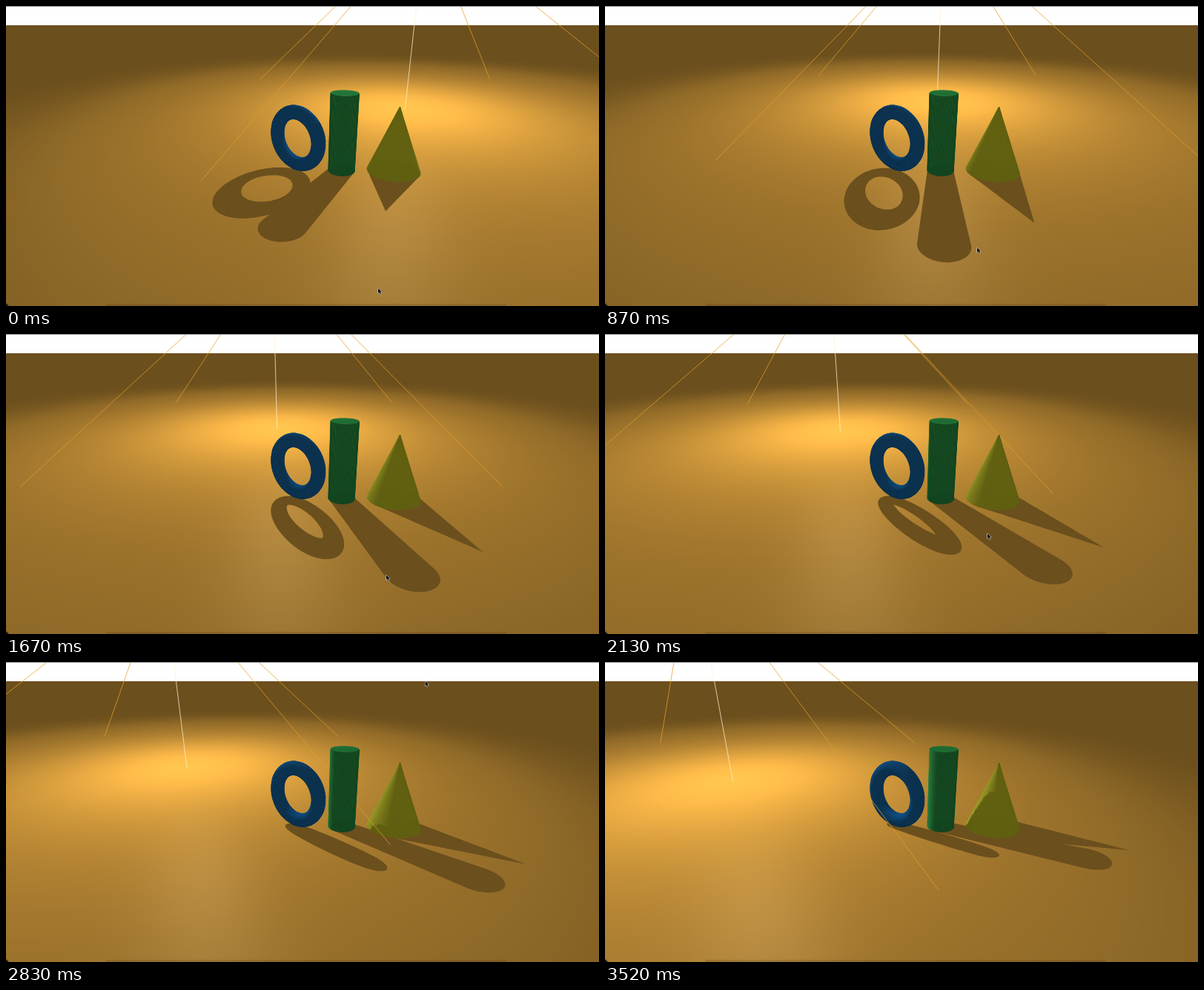
An HTML page with a canvas that plays this animation: 800 by 405 pixels, repeating every 3570 ms.

```html
<!DOCTYPE html>
<html>
<head>
<meta charset="utf-8">
<title>Spotlight over three solids</title>
<style>
html, body { margin: 0; width: 100%; height: 100%; overflow: hidden; background: #fff; }
canvas { display: block; }
</style>
</head>
<body>
<canvas id="stage" width="800" height="405"></canvas>
<script>
const ctx = document.getElementById('stage').getContext('2d');
const LOOP = 3570, STEP = 100 / 3, TAU = Math.PI * 2;

// World: x right, y up, z away from the viewer, who stands above the origin.
const eye = [0, 11.67, 0], FOCAL = 489, SIN = Math.sin(.39), COS = Math.cos(.39);
const LIGHT_HEIGHT = 20, ORBIT = 20, ORBIT_Z = 28, ROW_Z = 25.4, HORIZON = 26, CELL = 4;
const pillar = { x: 3, radius: 1, height: 6 };
const floorColor = { dark: [107, 79, 29], lit: [165, 120, 50] };

const clamp = v => Math.max(0, Math.min(1, v));
const ramp = (t, a, b) => clamp((t - a) / (b - a));
const smooth = (t, a, b) => { const u = ramp(t, a, b); return u * u * (3 - 2 * u); };
const sub = (a, b) => a.map((v, i) => v - b[i]);
const mix = (a, b, u) => a.map((v, i) => v + (b[i] - v) * u);
const dot = (a, b) => a[0] * b[0] + a[1] * b[1] + a[2] * b[2];
const unit = a => { const n = Math.hypot(...a) || 1; return a.map(v => v / n); };
const cross = (a, b) => [a[1] * b[2] - a[2] * b[1], a[2] * b[0] - a[0] * b[2], a[0] * b[1] - a[1] * b[0]];

function project([x, y, z]) {
  const drop = eye[1] - y, depth = z * COS + drop * SIN;
  return [400 + FOCAL * x / depth, 202 + FOCAL * (drop * COS - z * SIN) / depth];
}

function floorAt(sx, sy) {
  const k = (sy - 202) / FOCAL, z = eye[1] * (COS - k * SIN) / (SIN + k * COS);
  return [(sx - 400) / FOCAL * (z * COS + eye[1] * SIN), 0, z];
}

// Facets of a surface point(u, v), with u and v from 0 to 1.
function mesh(point, nu, nv, dark, lit) {
  const facets = [];
  for (let i = 0; i < nu; i++) for (let j = 0; j < nv; j++) {
    const corners = [[i, j], [i + 1, j], [i + 1, j + 1], [i, j + 1]].map(([a, b]) => point(a / nu, b / nv));
    const [a, b, c, d] = corners;
    const center = mix(mix(a, c, .5), mix(b, d, .5), .5);
    const normal = unit(cross(sub(c, a), sub(d, b)));
    const visible = dot(normal, sub(eye, center)) > 0;
    facets.push({ corners, center, normal, visible, dark, lit, screen: corners.map(project) });
  }
  return facets.sort((p, q) => q.center[2] - p.center[2]);
}

// profile(u) gives radius and height
const revolve = (x, profile) => (u, v) => {
  const [r, y] = profile(u), a = TAU * v;
  return [x + r * Math.cos(a), y, ROW_Z + r * Math.sin(a)];
};

function torus(u, v) {
  const turn = -.7, a = TAU * u, b = TAU * v, r = 2 + .5 * Math.cos(b), side = r * Math.cos(a), off = .5 * Math.sin(b);
  return [
    -.4 + side * Math.cos(turn) - off * Math.sin(turn),
    2.6 + r * Math.sin(a),
    ROW_Z + side * Math.sin(turn) + off * Math.cos(turn)
  ];
}

const pillarMesh = mesh(revolve(pillar.x, u => [u < 1 ? 1 : 0, u > 0 ? pillar.height : 0]), 2, 72, [16, 70, 32], [65, 150, 85]);
const solids = [
  mesh(torus, 72, 24, [8, 48, 80], [12, 55, 95]),
  pillarMesh,
  mesh(revolve(7, u => [2 - 2 * u, 5 * u]), 30, 72, [96, 96, 18], [110, 110, 45])
];

function brightness(p, normal, light) {
  const ray = unit(sub(light, p));
  return Math.max(0, dot(normal, ray)) * ray[1] * smooth(ray[1], .3, .5);
}

// Does the pillar stand between a point and the light?
function blocked([px, py, pz], light) {
  const dx = light[0] - px, dz = light[2] - pz, wx = pillar.x - px, wz = ROW_Z - pz;
  const len2 = dx * dx + dz * dz, near = (wx * dx + wz * dz) / len2;
  const inside = pillar.radius ** 2 - (wx * wx + wz * wz - near * near * len2);
  if (near <= 0 || inside <= 0) return false;
  const entry = near - Math.sqrt(inside / len2);
  return py + entry * (light[1] - py) < pillar.height;
}

const small = document.createElement('canvas');
small.width = 800 / CELL;
small.height = Math.ceil((405 - HORIZON) / CELL);
const smallCtx = small.getContext('2d');
const shade = smallCtx.createImageData(small.width, small.height);
const floorPoints = Array.from({ length: small.width * small.height }, (_, i) =>
  floorAt((i % small.width + .5) * CELL, HORIZON + (Math.floor(i / small.width) + .5) * CELL));

function drawFloor(light) {
  floorPoints.forEach((p, i) => {
    const b = brightness(p, [0, 1, 0], light);
    const toEye = unit(sub(eye, p)), toLight = unit(sub(light, p));
    const gloss = 18 * unit(toEye.map((v, c) => v + toLight[c]))[1] ** 40;
    for (let c = 0; c < 3; c++) shade.data[i * 4 + c] = floorColor.dark[c] + floorColor.lit[c] * b + gloss;
    shade.data[i * 4 + 3] = 255;
  });
  smallCtx.putImageData(shade, 0, 0);
  ctx.drawImage(small, 0, HORIZON, small.width * CELL, small.height * CELL);
}

function addPolygon(points) {
  points.forEach(([x, y], i) => i ? ctx.lineTo(x, y) : ctx.moveTo(x, y));
  ctx.closePath();
}

function drawShadows(light) {
  const cast = p => project(mix(light, p, light[1] / (light[1] - p[1])));
  ctx.fillStyle = `rgb(${floorColor.dark})`;
  for (const solid of solids) {
    ctx.beginPath();
    for (const f of solid) {
      if (dot(f.normal, sub(light, f.center)) > 0) addPolygon(f.corners.map(cast));
    }
    ctx.fill();
  }
}

function drawSolid(solid, light) {
  ctx.lineWidth = .6;
  for (const f of solid) {
    if (!f.visible) continue;
    const shaded = solid !== pillarMesh && blocked(f.center, light);
    const b = shaded ? 0 : brightness(f.center, f.normal, light);
    ctx.fillStyle = ctx.strokeStyle = `rgb(${f.dark.map((v, c) => Math.round(v + f.lit[c] * b))})`;
    ctx.beginPath();
    addPolygon(f.screen);
    ctx.fill();
    ctx.stroke();
  }
}

function drawLine(from, to, color) {
  ctx.beginPath();
  ctx.moveTo(...project(from));
  ctx.lineTo(...project(to));
  ctx.strokeStyle = color;
  ctx.lineWidth = 1;
  ctx.stroke();
}

function drawPointer(t) {
  const settle = 1 - ramp(t, 0, 1000), leave = Math.max(0, t - 1700) / 1130;
  ctx.save();
  ctx.translate(502 + 11 * ramp(t, 1230, 1670) + 52 * leave ** 3, 325 + 56 * settle ** 2 - 298 * leave ** 1.75);
  ctx.beginPath();
  addPolygon([[0, 0], [0, 7], [1.7, 5.6], [2.9, 8.2], [4.1, 7.6], [3, 5.2], [5, 5]]);
  ctx.lineWidth = 1;
  ctx.strokeStyle = '#eee';
  ctx.stroke();
  ctx.fillStyle = '#111';
  ctx.fill();
  ctx.restore();
}

function draw(t) {
  const angle = .684 - .000513 * t, orange = 'rgba(228,158,42,.75)';
  const foot = [ORBIT * Math.sin(angle), 0, ORBIT_Z + ORBIT * Math.cos(angle)];
  const light = [foot[0], LIGHT_HEIGHT, foot[2]];
  const corners = [[-1, -1], [1, -1], [-1, 1], [1, 1]].map(([i, j]) => [foot[0] + 20 * i, 0, foot[2] + 20 * j]);

  ctx.fillStyle = '#fff';
  ctx.fillRect(0, 0, 800, 405);
  drawFloor(light);
  drawShadows(light);

  // Rays reach in front of the solids once they pass the pillar's near side.
  const front = ROW_Z - pillar.radius;
  const split = corners.map(c => mix(light, c, clamp((light[2] - front) / Math.max(1, light[2] - c[2]))));
  split.forEach(p => drawLine(light, p, orange));
  drawLine(light, foot, 'rgba(255,240,210,.75)');
  solids.forEach(solid => drawSolid(solid, light));
  corners.forEach((c, i) => drawLine(split[i], c, orange));

  ctx.fillStyle = '#8c8c8c';
  ctx.fillRect(0, 0, 800, 1);
  ctx.fillStyle = 'rgba(50,35,10,.15)';
  ctx.fillRect(135, 402, 540, 3);
  ctx.fillStyle = '#1c1710';
  ctx.beginPath();
  addPolygon([[0, 401], [4, 405], [0, 405]]);
  ctx.fill();
  drawPointer(t);
}

function tick(now) {
  draw(Math.min(3520, Math.floor((now % LOOP + 4) / STEP) * STEP));
  requestAnimationFrame(tick);
}
tick(0);
</script>
</body>
</html>
```
